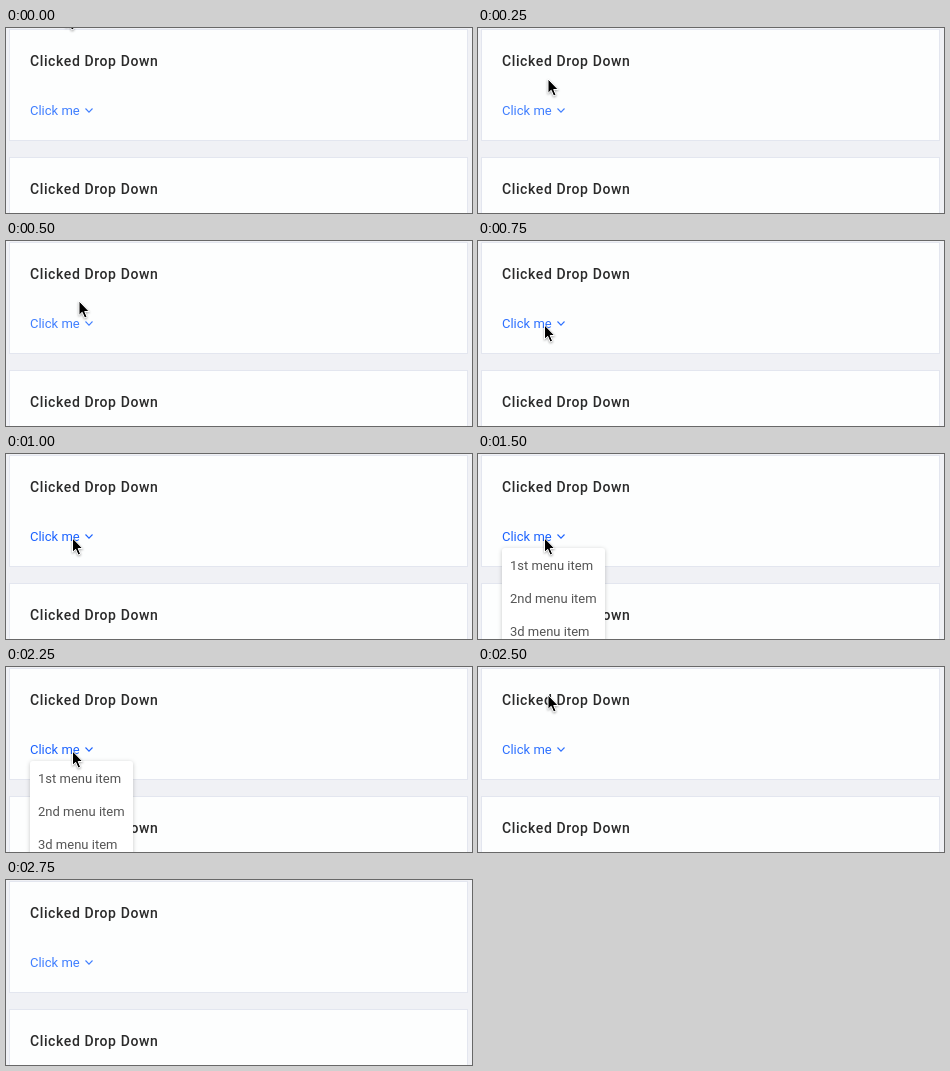
These frames come from a looping animation (466 px wide and 185 px high, 4000 ms). An HTML page:

```html
<!DOCTYPE html>
<html lang="en">
<head>
<meta charset="utf-8">
<style>
  html, body { margin: 0; width: 100%; height: 100%; overflow: hidden; background: #f0f1f5; }
  svg { display: block; width: 466px; height: 185px; font: 13px Roboto, Inter, sans-serif; }
  .card { fill: #fdfefe; stroke: #e3e6ef; }
  .title { font-size: 14px; font-weight: 500; letter-spacing: .6px; fill: #2a2a2a; }
  .panel { fill: #fff; filter: drop-shadow(0 1px 2px rgba(0, 0, 0, .22)); }
  .item { fill: #555; }
</style>
</head>
<body>
<svg viewBox="0 0 466 185">
  <rect class="card" x="3.5" y="1.5" width="458" height="111"/>
  <rect class="card" x="3.5" y="129.5" width="458" height="111"/>
  <text class="title" x="24" y="38">Clicked Drop Down</text>
  <text class="title" x="24" y="166">Clicked Drop Down</text>
  <g id="link">
    <text x="24" y="87" fill="currentColor">Click me</text>
    <path d="M79.5 80.5l3.5 3.7 3.5-3.7" fill="none" stroke="currentColor" stroke-width="1.1"/>
  </g>
  <g id="menu">
    <rect class="panel" x="24" y="94" width="103" height="110" rx="3"/>
    <text class="item" x="32" y="115.5">1st menu item</text>
    <text class="item" x="32" y="148.5">2nd menu item</text>
    <text class="item" x="32" y="181.5">3d menu item</text>
  </g>
  <path id="cursor" d="M0 0V14.3L3.2 11.3L5.6 17L8.1 16L5.7 10.5H10.2Z"
    fill="#000" stroke="#fff" stroke-width="1" stroke-linejoin="round"
    style="filter: drop-shadow(0 1px 1px rgba(0, 0, 0, .35))"/>
</svg>
<script>
const LOOP = 4000;
const MENU_TOP = 94;
const IDLE = '#407fff', FADING = '#2e71ff', HOVER = '#1c63ff';

const steps = [
  { at: 0, cursor: [60, -15], color: IDLE, opacity: 0, scale: 1 },
  { at: 250, cursor: [70, 51] },
  { at: 500, cursor: [73, 60] },
  { at: 750, cursor: [66.5, 84], color: FADING },
  { at: 1000, color: HOVER },
  { at: 1250, opacity: .76, scale: .955 },
  { at: 1500, opacity: 1, scale: 1 },
  { at: 2500, cursor: [70, 28], color: FADING, opacity: 0 },
  { at: 2750, cursor: null, color: IDLE }
];

const [link, menu, cursor] = ['link', 'menu', 'cursor'].map(id => document.getElementById(id));

function render(time) {
  const state = Object.assign({}, ...steps.filter(step => step.at <= time));
  link.style.color = state.color;
  menu.setAttribute('opacity', state.opacity);
  menu.setAttribute('transform', `translate(0 ${MENU_TOP * (1 - state.scale)}) scale(1 ${state.scale})`);
  cursor.setAttribute('visibility', state.cursor ? 'visible' : 'hidden');
  if (state.cursor) cursor.setAttribute('transform', `translate(${state.cursor})`);
}

const start = performance.now();
function tick() {
  render((performance.now() - start) % LOOP);
  requestAnimationFrame(tick);
}
tick();
</script>
</body>
</html>
```
